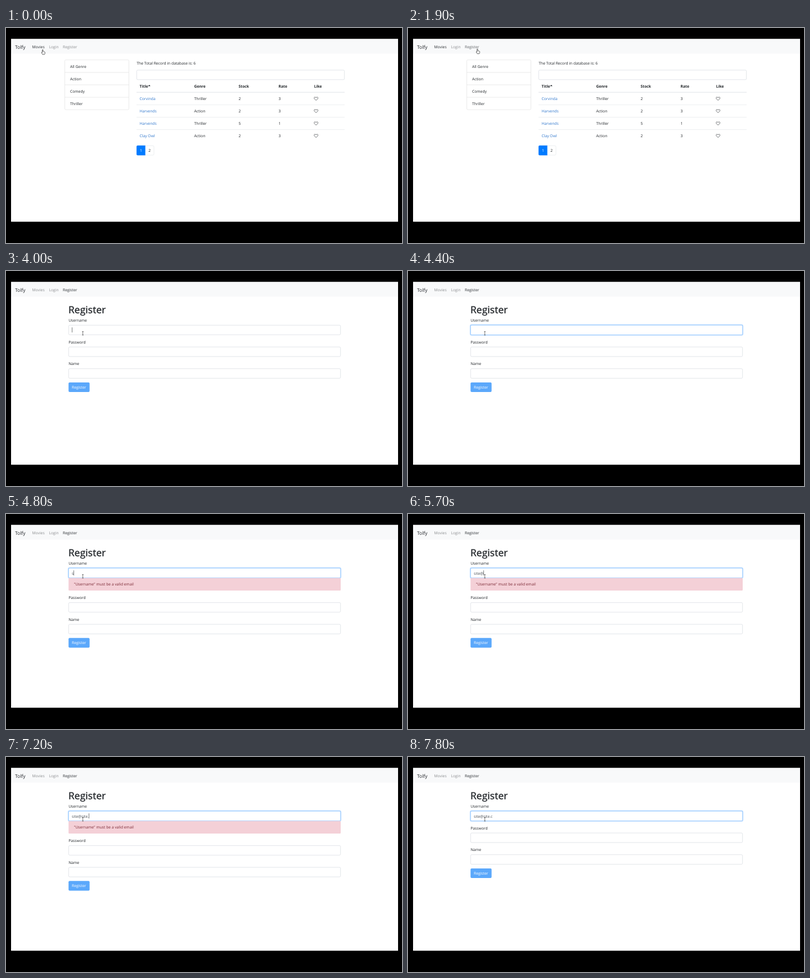
These frames come from a looping animation (704 px wide and 382 px high, 8000 ms). An HTML page:

```html
<!DOCTYPE html>
<html lang="en">
<head>
<meta charset="utf-8">
<title>Movie list and registration</title>
<style>
  html, body { margin: 0; width: 100%; height: 100%; overflow: hidden; background: #000; }
  svg { display: block; width: 704px; height: 382px; }
  text { font: 400 6.75px "Open Sans", "Noto Sans", sans-serif; fill: #212529; text-rendering: geometricPrecision; }
  .brand { font-size: 8.5px; }
  .bold { font-weight: 700; }
  .link { fill: #2f76cc; }
  .white { fill: #fff; }
  .typed { fill: #495057; }
  .alert { fill: #7a2733; }
  .title { font-size: 17.3px; letter-spacing: .15px; stroke: #212529; stroke-width: .35px; }
</style>
</head>
<body>
<svg id="stage" viewBox="0 0 704 382" xmlns="http://www.w3.org/2000/svg"></svg>
<script>
const LOOP = 8000;
const EMAIL = "site@site.c";
const ALERT_SHIFT = 22.4;

const text = (x, y, str, cls = "", extra = "") =>
  `<text x="${x}" y="${y}" class="${cls}" ${extra}>${str}</text>`;
const box = (x, y, w, h, fill, stroke = "none", r = 0, extra = "") =>
  `<rect x="${x}" y="${y}" width="${w}" height="${h}" rx="${r}" fill="${fill}" stroke="${stroke}" stroke-width=".6" ${extra}/>`;
const rule = (x1, x2, y, color, width) =>
  `<path d="M${x1} ${y}H${x2}" stroke="${color}" stroke-width="${width}"/>`;
const field = (x, y, w, extra = "") => box(x, y, w, 17, "#fff", "#ced4da", 1.9, extra);

function navBar() {
  return box(9, 19.5, 688, 26, "#f8f9fa") +
    text(16, 37, "Tolfy", "brand") +
    text(46.5, 36.2, "Movies", "", 'id="movies"') +
    text(76.5, 36.2, "Login", "", 'id="login"') +
    text(101, 36.2, "Register", "", 'id="register"');
}

function moviesPage() {
  const cols = [237.5, 334.5, 413.5, 484.5];
  const rows = [
    ["Corvinda", "Thriller", 2, 3],
    ["Harvends", "Action", 2, 3],
    ["Harvends", "Thriller", 5, 1],
    ["Clay Owl", "Action", 2, 3]
  ];
  let out = box(104.5, 56.7, 114, 88.4, "#fff", "#dcdcdc", 1.9);
  ["All Genre", "Action", "Comedy", "Thriller"].forEach((name, i) => {
    if (i) out += rule(104.5, 218.5, 56.9 + i * 22.05, "#dcdcdc", .6);
    out += text(114, 70.7 + i * 22.05, name);
  });
  out += text(232.3, 65, "The Total Record in database is: 6") + field(232.4, 74.8, 369.2);
  ["Title", "Genre", "Stock", "Rate"].forEach((name, i) => out += text(cols[i], 106, name, "bold"));
  out += text(547.7, 106, "Like", "bold") +
    '<path d="M252.5 103.3L254.7 101L256.9 103.3Z" fill="#212529"/>' +
    rule(232, 602, 114.2, "#dee2e6", .95);
  rows.forEach((row, i) => {
    const y = 128 + i * 22;
    if (i) out += rule(232, 602, y - 13.5, "#dee2e6", .55);
    row.forEach((cell, c) => out += text(cols[c], y, cell, c ? "" : "link"));
    out += `<path transform="translate(551.2 ${y - 2.4})" d="M0 3L-2.9 .1C-4.2-1.4-2.9-3.1-1.5-2.8Q-.5-2.6 0-1.7Q.5-2.6 1.5-2.8C2.9-3.1 4.2-1.4 2.9 .1Z" fill="none" stroke="#212529" stroke-width=".65"/>`;
  });
  return out + box(232.4, 209.1, 30.6, 16.8, "#fff", "#dee2e6", 1.9) +
    '<path d="M247.7 208.8V226.2H234Q232.1 226.2 232.1 224.3V210.7Q232.1 208.8 234 208.8Z" fill="#007bff"/>' +
    text(240, 220.3, "1", "white", 'text-anchor="middle"') +
    text(255.2, 220.3, "2", "", 'text-anchor="middle"');
}

function registerPage() {
  return text(111, 74.6, "Register", "title") +
    text(111.2, 90, "Username") +
    box(110.7, 95.6, 484.6, 18.4, "none", "#007bff", 2.4, 'id="glow" style="stroke-width:1.6px"') +
    field(111.4, 96.3, 483.3, 'id="user"') +
    text(117, 107.5, "", "typed", 'id="typed"') +
    box(0, 100.2, .6, 9, "#212529", "none", 0, 'id="caret"') +
    '<g id="alert">' + box(111.2, 113.7, 483.8, 22.2, "#f4d0d7", "none", 1.2) +
    text(120.7, 127.4, '"Username" must be a valid email', "alert") + "</g>" +
    '<g id="rest">' +
    text(111.2, 129, "Password") + field(111.4, 135, 483.3) +
    text(111.2, 167.4, "Name") + field(111.4, 173.6, 483.3) +
    box(111.2, 197.9, 37.4, 17.1, "#5ba8fb", "none", 1.9) +
    text(117, 209, "Register", "white") + "</g>";
}

const HAND = '<g id="hand"><path d="M-1.5 .6V-3.6Q-1.5-4.4-.8-4.4T-.1-3.6V-1.2Q1-1.5 1.3-.8Q2.3-1 2.5-.3Q3.3-.3 3.3 .6V2Q3.2 3 2.5 4.1H-1.1Q-1.9 2.7-2.9 1.4Q-3.2 .6-2.4 .4Q-1.9 .4-1.5 .9Z" fill="#fff" stroke="#222" stroke-width=".7" stroke-linejoin="round"/></g>';
const BEAM = '<g id="beam"><path d="M-1.4-3.1H1.4M-1.4 3.1H1.4M0-3.1V3.1" fill="none" stroke="#333" stroke-width=".65"/></g>';

document.getElementById("stage").innerHTML =
  box(0, 0, 704, 382, "#000") + box(9, 19.5, 688, 324.7, "#fff") + navBar() +
  `<g id="list">${moviesPage()}</g><g id="form">${registerPage()}</g>` + HAND + BEAM;

const el = id => document.getElementById(id);
const show = (id, on) => el(id).setAttribute("display", on ? "inline" : "none");
const within = (t, spans) => spans.some(([a, b]) => t >= a && t < b);
// last entry whose start time has passed
const latest = (t, steps) => steps.reduce((cur, s) => t >= s[0] ? s : cur);

const MOVES = [
  [0, 66, 42.8], [1400, 66.2, 43.3], [1700, 84, 32], [1800, 108, 27], [1900, 124.2, 41.6],
  [3600, 125, 46], [3700, 129, 66], [3800, 134, 93], [3900, 136.6, 110.7]
];
const KEYS = [
  [0, 0], [4800, 1], [4900, 2], [5000, 3], [5100, 4], [5700, 5],
  [6000, 6], [6100, 7], [6300, 9], [7200, 10], [7400, 11]
];
const CARET_ON = [[4000, 4400], [4800, 5400], [5700, 6700], [7000, 7800]];
const INVALID = [[4800, 6000], [7200, 7400]];

function render(t) {
  const onForm = t >= 3200;
  const [, x, y] = latest(t, MOVES);
  const beam = y > 55;

  show("list", !onForm);
  show("form", onForm);
  show("hand", !beam);
  show("beam", beam);
  el(beam ? "beam" : "hand").setAttribute("transform", `translate(${x} ${y})`);

  const tint = (id, active, hover) => el(id).setAttribute("fill-opacity", active ? .95 : hover ? .7 : .5);
  tint("movies", !onForm, false);
  tint("login", false, x > 76 && x < 95);
  tint("register", onForm, x > 101);

  const invalid = within(t, INVALID);
  show("alert", invalid);
  el("rest").setAttribute("transform", `translate(0 ${invalid ? ALERT_SHIFT : 0})`);

  const focus = t < 4100 ? 0 : t < 4200 ? .5 : 1;
  el("glow").setAttribute("stroke-opacity", .28 * focus);
  el("user").setAttribute("stroke", ["#ced4da", "#a7c9ed", "#80bdff"][focus * 2]);

  const typed = el("typed");
  const value = EMAIL.slice(0, latest(t, KEYS)[1]);
  if (typed.textContent !== value) typed.textContent = value;
  const caret = within(t, CARET_ON);
  show("caret", caret);
  if (caret) el("caret").setAttribute("x", 117.1 + (value ? typed.getComputedTextLength() : 0));
}

function tick() {
  render(performance.now() % LOOP);
  requestAnimationFrame(tick);
}
tick();
</script>
</body>
</html>
```
